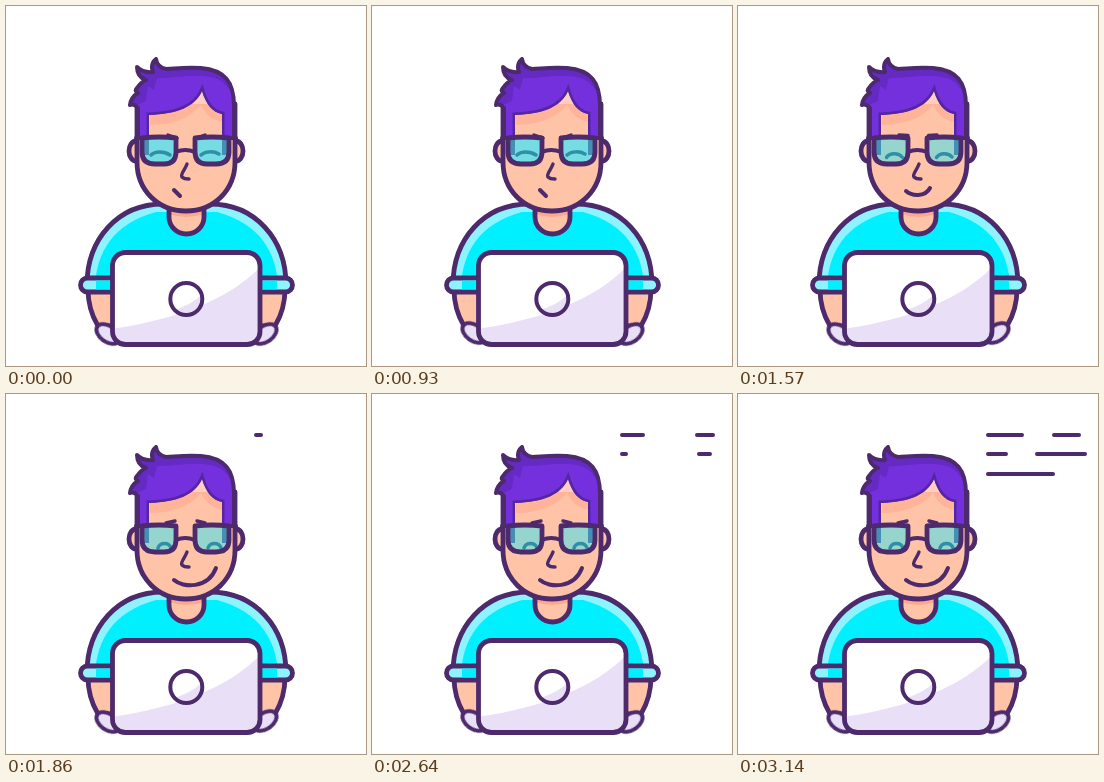
An HTML page that plays this animation: 360x360 px, repeating every 3570 ms.

```html
<!DOCTYPE html>
<html lang="en">
<head>
<meta charset="utf-8">
<title>Typing at a laptop</title>
<style>
  html, body { margin: 0; width: 100%; height: 100%; overflow: hidden; background: #fff; }
  svg { display: block; width: 100vw; height: 100vh; }
  .ink { stroke: #4c2a6b; stroke-width: 4.8; stroke-linecap: round; stroke-linejoin: round; }
  .none { fill: none; }
  .skin { fill: #ffc3a8; }
  .tan { fill: #ffa78e; }
  .hair { fill: #7430dc; }
  .shade { fill: #6529c4; }
  .cyan { fill: #00f0ff; }
  .pale { fill: #8df3ff; }
  .lilac { fill: #e9e0f8; }
  .white { fill: #fff; }
  .eye { stroke: #2f8fa6; stroke-width: 3.5; stroke-linecap: round; fill: none; }
  .mid { stroke-width: 4; }
  .thin { stroke-width: 3.4; }

  /* The loop has 50 ticks, so one tick is 2%. */
  .hand, .face, .lens, .line, .mark { animation: 3570ms step-end -8ms infinite; }
  .hand.l { animation-name: tapL; }
  .hand.r { animation-name: tapR; }
  .lens { fill: #76dce4; animation-name: lens; }
  .face { animation-timing-function: steps(4); }
  .mouth { animation-name: mouth; }
  .eyeL { animation-name: eyeL; }
  .eyeR { animation-name: eyeR; }
  .browL { animation-name: browL; }
  .browR { animation-name: browR; }
  .line { fill: none; stroke-width: 4; stroke-dasharray: 0 0 0 999; }
  .one { animation-name: one; }
  .two { animation-name: two; }
  .three { animation-name: three; }
  .mark { fill: #d9d0ec; animation-name: mark; }

  @keyframes tapL {
    0%, 4%, 12%, 20%, 28%, 36%, 44%, 52%, 60%, 68%, 76%, 84%, 100% { transform: none; }
    2%, 10%, 18%, 26%, 34%, 42%, 50%, 58%, 66%, 74%, 82% { transform: translateY(-1px); }
  }
  @keyframes tapR {
    0%, 6%, 14%, 22%, 30%, 38%, 46%, 54%, 62%, 70%, 78%, 86%, 100% { transform: none; }
    4%, 12%, 20%, 28%, 36%, 44%, 52%, 60%, 68%, 76%, 84% { transform: translateY(-1px); }
  }
  @keyframes lens {
    0% { fill: #76dce4; }
    44%, 100% { fill: #96d5cd; }
  }
  @keyframes mouth {
    0%, 40% { d: path("M168 184C170 186 172 188 174 190"); }
    48%, 100% { d: path("M168 186C177 194 202 195 210 174"); }
  }
  @keyframes eyeL {
    0%, 40% { d: path("M145 149C149 145 158 145 164 149"); }
    48%, 100% { d: path("M152 154C154 148 163 148 165 154"); }
  }
  @keyframes eyeR {
    0%, 40% { d: path("M195 149C199 145 208 145 213 148"); }
    48%, 100% { d: path("M202 154C204 148 213 148 215 154"); }
  }
  @keyframes browL {
    0%, 40% { d: path("M162 129L171 132"); }
    48%, 100% { d: path("M160 129L169 127"); }
  }
  @keyframes browR {
    0%, 40% { d: path("M190 132L199 129"); }
    48%, 100% { d: path("M191 127L199 129"); }
  }
  @keyframes one {
    0% { opacity: 0; }
    52% { opacity: 1; stroke-dasharray: 5 0 0 999; animation-timing-function: steps(5); }
    62% { opacity: 1; stroke-dasharray: 29 56 6 999; animation-timing-function: steps(6); }
    74% { opacity: 1; stroke-dasharray: 21 54 16 999; animation-timing-function: steps(7); }
    88%, 100% { opacity: 1; stroke-dasharray: 34 32 25 999; }
  }
  @keyframes two {
    0% { opacity: 0; }
    60% { opacity: 1; stroke-dasharray: 4 0 0 999; animation-timing-function: steps(1); }
    62% { opacity: 1; stroke-dasharray: 18 0 0 999; animation-timing-function: steps(6); }
    74% { opacity: 1; stroke-dasharray: 4 73 11 999; animation-timing-function: steps(7); }
    88%, 100% { opacity: 1; stroke-dasharray: 18 31 48 999; }
  }
  @keyframes three {
    0% { opacity: 0; }
    76% { opacity: 1; stroke-dasharray: 2 0 0 999; animation-timing-function: steps(6); }
    88%, 100% { opacity: 1; stroke-dasharray: 65 0 0 999; }
  }
  @keyframes mark {
    0%, 18%, 100% { opacity: 0; }
    14% { opacity: 1; }
  }
</style>
</head>
<body>
<svg viewBox="0 0 360 360">
  <defs>
    <path id="torso" d="M81 279C81 233 112 198 157 198H204C249 198 280 233 280 279Z"/>
    <path id="neck" d="M163 194V211A17.5 17 0 0 0 198 211V194Z"/>
    <path id="head" d="M131 98V156C131 184 152 205 180 205S229 184 229 156V98"/>
    <path id="hair" d="M132 131V102Q128 97 124 99Q125 91 132 87Q128 85 131 82Q135 76 140 74Q131 71 131 61Q137 67 147 66Q144 58 150 53Q151 61 160 63C175 62 181 61 195 62C219 64 228 76 228 100V131H216V108C206 106 200 98 196 85C189 101 171 108 143 109V131Z"/>
    <path id="lensL" d="M136 132Q153 130 170 132V146Q170 158 158 158H149Q136 158 136 146Z"/>
    <path id="lensR" d="M189 132Q206 130 223 132V146Q223 158 210 158H201Q189 158 189 146Z"/>
    <rect id="lid" x="106.5" y="246.5" width="147.5" height="92" rx="13"/>
    <circle id="disc" cx="180.3" cy="293" r="16"/>
    <clipPath id="inTorso"><use href="#torso"/></clipPath>
    <clipPath id="inNeck"><use href="#neck"/></clipPath>
    <clipPath id="inHair"><use href="#hair"/></clipPath>
    <clipPath id="inLid"><use href="#lid"/></clipPath>
    <clipPath id="inDisc"><use href="#disc"/></clipPath>
  </defs>

  <!-- arms and hands -->
  <path class="ink skin" d="M82 283C82 298 86 310 92 320H110V283Z"/>
  <path class="ink skin" d="M279 283C279 298 275 310 269 320H250V283Z"/>
  <g class="hand l"><ellipse class="ink mid lilac" cx="102" cy="328" rx="13" ry="8" transform="rotate(35 102 328)"/></g>
  <g class="hand r"><ellipse class="ink mid lilac" cx="259" cy="328" rx="13" ry="8" transform="rotate(-35 259 328)"/></g>

  <!-- shirt -->
  <use href="#torso" class="pale"/>
  <path class="cyan" clip-path="url(#inTorso)" d="M89 279C91 247 106 218 150 206H211C255 218 270 247 272 279Z"/>
  <use href="#torso" class="ink none"/>
  <rect class="ink pale" x="74.5" y="272" width="40" height="14" rx="7"/>
  <rect class="ink pale" x="246.5" y="272" width="40" height="14" rx="7"/>
  <path class="cyan" d="M90 274.4H110V283.6H90ZM250 274.4H271V283.6H250Z"/>
  <use href="#neck" class="skin"/>
  <path class="tan" clip-path="url(#inNeck)" d="M160 190H201V207Q180 215 160 207Z"/>
  <use href="#neck" class="ink none"/>

  <!-- head -->
  <ellipse class="ink skin" cx="130" cy="145" rx="7" ry="10"/>
  <ellipse class="ink skin" cx="230" cy="145" rx="7" ry="10"/>
  <use href="#head" class="ink skin"/>
  <path class="tan" opacity=".55" d="M144 109C171 108 187 102 196 85C201 101 207 107 216 108V116C204 113 199 107 195 99C185 112 166 119 144 119Z"/>
  <use href="#hair" class="hair"/>
  <g clip-path="url(#inHair)">
    <path class="shade" d="M120 104V50H200C220 62 226 74 226 88C218 72 206 70 190 70C172 70 160 73 151 72L148 84L142 80L140 95Z"/>
    <path d="M216 131V108C206 106 200 98 196 85C189 101 171 108 143 109V131" fill="none" stroke="#5526a0" stroke-width="5"/>
  </g>
  <path class="ink none mid" d="M132 131V102Q128 97 124 99Q125 91 132 87Q128 85 131 82Q135 76 140 74Q131 71 131 61Q137 67 147 66Q144 58 150 53Q151 61 160 63C175 62 181 61 195 62C219 64 228 76 228 100V131"/>

  <!-- glasses and face -->
  <use href="#lensL" class="lens"/>
  <use href="#lensR" class="lens"/>
  <path fill="#458fb4" d="M136 132H143V149H137ZM216 132H223V149H216Z"/>
  <path class="eye face eyeL" d="M145 149C149 145 158 145 164 149"/>
  <path class="eye face eyeR" d="M195 149C199 145 208 145 213 148"/>
  <path class="ink thin none face browL" d="M162 129L171 132"/>
  <path class="ink thin none face browR" d="M190 132L199 129"/>
  <g class="ink none">
    <use href="#lensL"/>
    <use href="#lensR"/>
    <path class="mid" d="M170 146Q179 142 189 146M130 132H136M223 132H230"/>
    <path class="thin" d="M181 158C179 164 174 168 176 171Q178 173 183 173"/>
  </g>
  <path class="ink mid none face mouth" d="M168 184C170 186 172 188 174 190"/>

  <!-- laptop -->
  <use href="#lid" class="white"/>
  <path class="lilac" clip-path="url(#inLid)" d="M256 259C226 292 170 314 104 323V342H256Z"/>
  <use href="#lid" class="ink none"/>
  <use href="#disc" class="white"/>
  <path class="lilac" clip-path="url(#inDisc)" d="M200 284Q188 299 164 305V314H200Z"/>
  <use href="#disc" class="ink mid none"/>

  <!-- written lines -->
  <path class="ink line one" d="M250 41H341"/>
  <path class="ink line two" d="M250 60H347"/>
  <path class="ink line three" d="M250 80H315"/>
  <path class="mark" d="M249 79H258Q256 82 253 82T249 79Z"/>
</svg>
</body>
</html>
```
